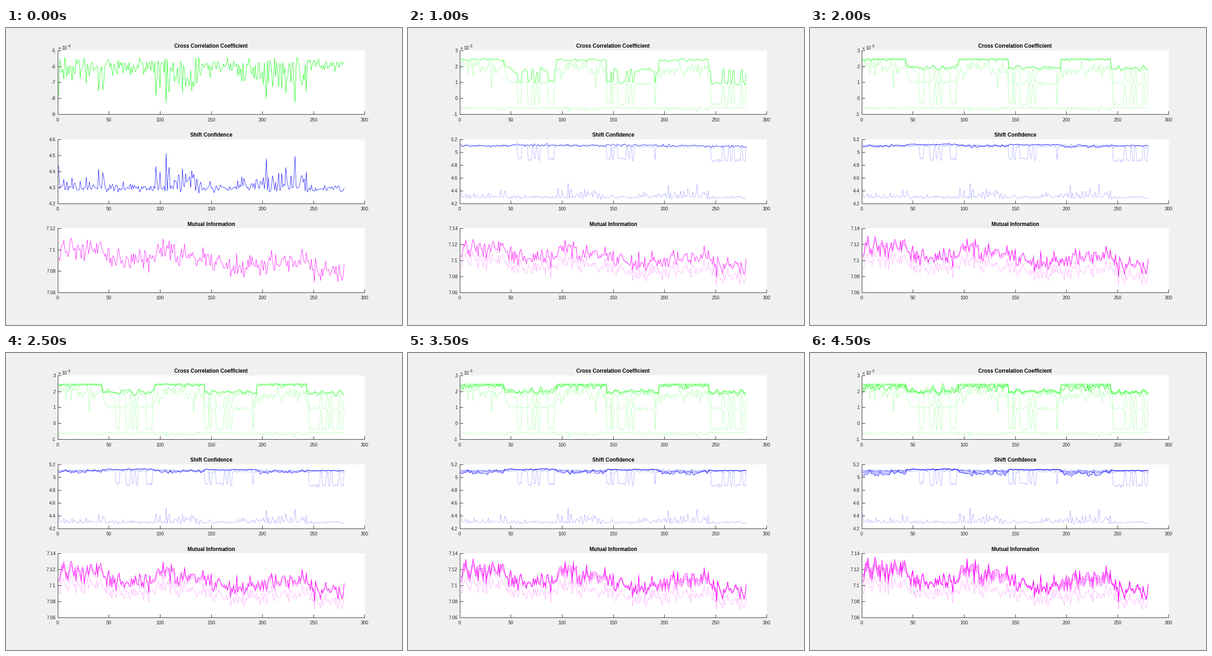
These frames come from a looping animation (864x648 px, 5000 ms). A matplotlib script:

```python
import numpy as np
import matplotlib.pyplot as plt
from matplotlib.animation import FuncAnimation

W, H, DPI = 864, 648, 96
N, STEPS = 280, 10
INK = (0.15, 0.15, 0.15)
LIME, BLUE, PINK = "#00ff00", "#0000ff", "#ff00ff"
plt.rcParams["font.family"] = "Liberation Sans"

rng = np.random.default_rng(12)
x = np.arange(1, N + 1)


def noise(smooth=False):
    e = rng.standard_normal(N)
    if smooth:
        e = 1.6 * np.convolve(e, [0.25, 0.5, 0.25], "same")
    return np.clip(e, -2.2, 2.2)


def within(*spans):
    return np.any([(x >= a) & (x <= b) for a, b in spans], axis=0)


# Three stretches with a strong signal; weak, flickering ones between them
high = within((1, 43), (95, 143), (195, 243))
late = x > 243
flicker = within((54, 80), (148, 179), (246, 279))
coin = np.repeat(rng.random(N // 2), 2)
drop = flicker & (coin < np.where(late, 0.6, 0.45))
drop |= within((87, 92), (144, 147), (191, 191), (250, 256))


def first_run():
    # Downward spikes are frequent where "busy" is large
    busy = np.interp(x, [1, 22, 44, 52, 92, 97, 108, 140, 150, 175, 182, 243, 250],
                     [1, 1.7, 1.6, 0.8, 0.7, 2, 2, 1.6, 0.7, 0.6, 1.6, 1.9, 0.5])
    depth = busy * rng.random(N) ** 1.8
    for i, peak in ((1, 1.9), (44, 1.9), (96, 2.1), (106, 2.7), (204, 2.4), (232, 2.4)):
        depth[i - 1] = peak
    c = np.clip(-5.7 - depth + 0.17 * noise(), -8.3, -5.2)
    d = -5.5 - c
    s = 4.282 + 0.015 * d + 0.023 * d * d + 0.009 * noise()
    m = np.interp(x, [1, 43, 47, 94, 97, 115, 145, 180, 200, 225, 243, 250, 280],
                  [7.1, 7.101, 7.09, 7.09, 7.101, 7.096, 7.09, 7.084,
                   7.087, 7.09, 7.089, 7.081, 7.077])
    return c / 10, s, m + 0.0052 * noise()


def second_run():
    level = np.interp(x, [43, 47, 53, 93, 96, 110, 142, 145, 192, 196, 242, 246],
                      [1.95, 1.1, 1, 1, 1.65, 1.95, 1.75, 0.95, 0.92, 1.75, 1.85, 0.8])
    c = level + np.where(high, 0.25, 0.06) * noise()
    c[[30, 132]] = 0.7
    s = 5.1 - 0.015 * (x > 143) + 0.008 * noise()
    c[drop] = -0.36 + 0.04 * noise()[drop]
    s[drop] = np.where(late, 4.865, 4.89)[drop] + 0.012 * noise()[drop]
    return np.minimum(c, 2.5), s


def third_run(mix):
    tail = np.interp(x, [43, 52], [0.2, 0])
    c = np.where(high, 2.4 + 0.05 * mix, 1.74 + tail + 0.1 * mix)
    c[drop] = np.where(late, 0.97, 1.06)[drop] + 0.06 * mix[drop]
    s = 5.1 + 0.01 * ~high * ~late - 0.012 * late + 0.012 * noise()
    return c, s


def later_run(g, mix, wave):
    # Strong stretches sag and roughen as g grows; weak ones settle
    top = 2.49 - 0.012 * g - (0.035 + 0.033 * g) * np.abs(mix)
    low = 1.89 + 0.03 * min(g, 4) + 0.08 * mix - 0.04 * late
    low += 0.02 * g * np.maximum(mix, 0) * (x < 95)
    c = np.where(high, top, low)
    calm = np.where(late, 5.1, np.where(x < 95, 5.12, 5.115))
    s = np.where(high, 5.1 - 0.0075 * g, calm)
    return c, s + np.where(high, 0.012 + 0.0015 * g, 0.006) * wave


def runs():
    """All ten runs as (correlation, confidence, information)."""
    c0, s0, m0 = first_run()
    out = [(c0, s0, m0)]
    wob, conf, info = noise(True), noise(True), noise()
    for k in range(1, STEPS):
        mix = 0.85 * wob + 0.5 * noise(True)
        wave = 0.85 * conf + 0.45 * noise(True)
        if k == 1:
            c, s = second_run()
        elif k == 2:
            c, s = third_run(mix)
        else:
            c, s = later_run(k - 3, mix, wave)
        lift = 0.0125 + np.where(high, 0.0011 * k, 0.0004 * min(k, 4))
        m = m0 + lift + 0.002 * info + 0.001 * noise()
        out.append((c, s, np.minimum(m, 7.136)))
    return out


fig = plt.figure(figsize=(W / DPI, H / DPI), dpi=DPI, facecolor="#f0f0f0")


def panel(bottom, title):
    ax = fig.add_axes([112.8 / W, bottom, 669.6 / W, 0.2157])
    ax.set_title(title, fontsize=8.67, fontweight="bold", color="black", pad=4)
    ax.set_xlim(0, 300)
    ax.set_xticks(range(0, 301, 50))
    ax.tick_params(direction="in", length=5, width=0.75, color=INK,
                   labelcolor=INK, labelsize=7.8)
    ax.tick_params(axis="x", pad=5.6)
    ax.tick_params(axis="y", pad=3.4)
    ax.patch.set(edgecolor="white", linewidth=0.75)
    for side in ("top", "right"):
        ax.spines[side].set_visible(False)
    for side in ("left", "bottom"):
        ax.spines[side].set(linewidth=0.75, color=INK)
    return ax


def label(px, py, text, size):
    return fig.text(px / W, 1 - py / H, text, fontsize=size, color=INK)


axes = [panel(0.7093, "Cross Correlation Coefficient"),
        panel(0.4096, "Shift Confidence"),
        panel(0.11, "Mutual Information")]
label(113, 47, "×", 7.8)
label(121.5, 47, "10", 7.8)
power = label(133.5, 42.5, "-4", 6.4)

lines = [[ax.plot(x, y, color=col)[0] for ax, y, col in zip(axes, run, (LIME, BLUE, PINK))]
         for run in runs()]

# Low limit, high limit, tick step and label scale per panel
FIRST = ((-0.9, -0.5, 0.1, 10), (4.2, 4.6, 0.1, 1), (7.06, 7.12, 0.02, 1))
REST = ((-1, 3, 1, 1), (4.2, 5.2, 0.2, 1), (7.06, 7.14, 0.02, 1))


def draw(k):
    power.set_text("-3" if k else "-4")
    for ax, (lo, hi, step, scale) in zip(axes, REST if k else FIRST):
        ticks = np.linspace(lo, hi, round((hi - lo) / step) + 1)
        ax.set_yticks(ticks, [f"{round(t * scale, 2):g}" for t in ticks])
        ax.set_ylim(lo, hi)
    for i, group in enumerate(lines):
        for line in group:
            line.set_visible(i <= k)
            line.set_linestyle("-" if i == k else (0, (1, 2)))
            line.set_linewidth(0.58 if i == k else 0.62)


anim = FuncAnimation(fig, draw, frames=STEPS, init_func=lambda: draw(0),
                     interval=500, repeat=True, repeat_delay=0)
plt.show()
```
